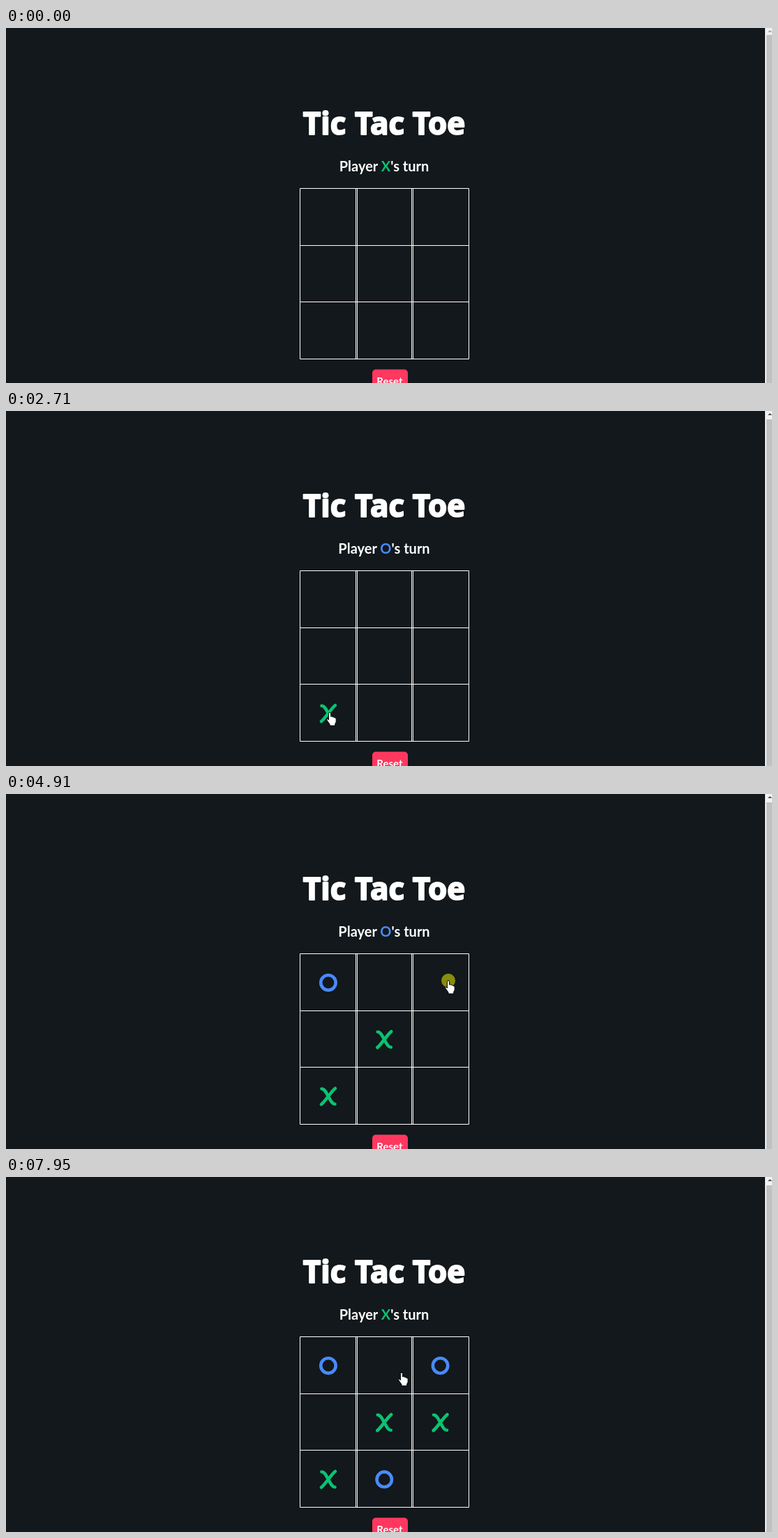
An HTML page that plays this animation: 1098 by 510 pixels, repeating every 8 s.

```html
<!DOCTYPE html>
<html>
<head>
<meta charset="utf-8">
<style>
html, body { margin: 0; height: 100%; overflow: hidden; background: #12181b; }
svg { display: block; }
text { font-family: Lato, "Open Sans", sans-serif; font-weight: 700; fill: #fff; text-anchor: middle; }
.title { font: 700 44px "Open Sans", sans-serif; stroke: #fff; stroke-width: 2; stroke-linejoin: round; }
.turn { font-size: 20px; }
.reset { font-size: 15px; }
.grid { stroke: #fff; fill: none; }
.mark { fill: none; stroke-width: 4.6; stroke-linecap: round; }
.pointer { fill: #fff; stroke: #000; stroke-linejoin: round; }
</style>
</head>
<body>
<svg width="1098" height="510" viewBox="0 0 1098 510">
  <g id="page">
    <text class="title" x="456.5" y="153">Tic</text>
    <text class="title" x="535.5" y="153">Tac</text>
    <text class="title" x="620.5" y="153">Toe</text>
    <text class="turn" x="542" y="205.5">Player <tspan id="player">X</tspan>'s turn</text>
    <path class="grid" d="M421.5 230.5h242v245h-242zM421 312.5h243m-243 81h243M501.5 230v246m2 0v-246m78 0v246m2 0v-246"/>
    <g id="marks"></g>
    <rect x="525" y="490.5" width="51" height="40" rx="5" fill="#ff3860"/>
    <text class="reset" x="550" y="513">Reset</text>
  </g>
  <rect x="1088" width="10" height="510" fill="#f1f1f1"/>
  <path id="arrow" d="M1092 6l3-3 3 3z"/>
  <rect id="thumb" x="1090" width="8" height="510" fill="#c1c1c1"/>
  <circle id="press" r="10" fill="#ff0" fill-opacity=".5"/>
  <path id="hand" class="pointer" d="M-1.6 11V1.5Q-1.6 0 0 0T1.6 1.5V6Q3.5 5 4.3 6.6Q6.3 6 6.8 7.6Q9.2 7 9.2 9.5V13Q9 15 7.8 16V19H0V17L-4.2 11Q-5 9 -3.2 9Q-2 9.3 -1.6 11Z"/>
  <path id="cursor" class="pointer" d="M0 0V16L4 12.5L6.5 18L9 17L6.5 11.5H11.5Z"/>
</svg>
<script>
const LOOP = 8000, ENTER = 200, SCROLL = 700, PRESS = 130;
const players = [
  { name: 'X', color: '#09c372', shape: 'M-9.5-11C-5-11-3-5 0 0S5 11 9.5 11M10-11.5C5-8-5 8-10 11.5' },
  { name: 'O', color: '#498afb', shape: 'M0-10.8a10.7 10.8 0 1 1 0 21.6a10.7 10.8 0 1 1 0-21.6' }
];

// Pointer stops; each glide takes `travel` ms and ends at `time`
const stop = (time, travel, x, y) => ({ time, travel, x, y });
const clicks = [
  stop(2440, 270, 464, 437),
  stop(3400, 760, 466, 276),
  stop(4090, 500, 526, 340),
  stop(4910, 550, 634, 268),
  stop(5780, 410, 639, 366),
  stop(7070, 700, 550, 442)
];
const stops = [
  stop(ENTER, 0, 1079, 281),
  stop(SCROLL, 400, 1092, 258),
  stop(1090, 130, 932, 260),
  stop(1980, 740, 352, 441),
  ...clicks,
  stop(7950, 350, 567, 281)
];

const $ = id => document.getElementById(id);
const show = (el, on) => el.style.display = on ? '' : 'none';
const smooth = k => k * k * (3 - 2 * k);
const cellMiddle = (v, first, size) => first + size * (Math.floor((v - first) / size) + 0.5);

const marks = clicks.map(({ x, y }, i) => {
  const { shape, color } = players[i % 2];
  const el = document.createElementNS('http://www.w3.org/2000/svg', 'path');
  el.setAttribute('class', 'mark');
  el.setAttribute('d', shape);
  el.setAttribute('stroke', color);
  el.setAttribute('transform', `translate(${cellMiddle(x, 421.8, 80.3)} ${cellMiddle(y, 231.2, 81.7)})`);
  return $('marks').appendChild(el);
});

function tipAt(t) {
  let { x, y } = stops[0];
  for (const s of stops.slice(1)) {
    const k = smooth(Math.min(1, Math.max(0, (t - s.time + s.travel) / s.travel)));
    x += (s.x - x) * k;
    y += (s.y - y) * k;
  }
  return [x, y];
}

function draw(t) {
  const scrolled = t >= SCROLL;
  $('page').setAttribute('transform', `translate(0 ${scrolled ? -1 : 0})`);
  $('arrow').setAttribute('fill', scrolled ? '#505050' : '#a3a3a3');
  $('thumb').setAttribute('y', scrolled ? 12 : 10);

  const placed = clicks.filter(c => t >= c.time + PRESS).length;
  const { name, color } = players[placed % 2];
  marks.forEach((el, i) => show(el, i < placed));
  $('player').textContent = name;
  $('player').style.fill = color;

  const [x, y] = tipAt(t);
  const overBoard = x > 421 && x < 664 && y > 229 && y < 475;
  for (const id of ['press', 'hand', 'cursor']) $(id).setAttribute('transform', `translate(${x} ${y})`);
  show($('hand'), overBoard);
  show($('cursor'), t >= ENTER && !overBoard);
  // The highlight leads the press by a moment
  show($('press'), clicks.some(c => t >= c.time - 20 && t < c.time + PRESS));
}

const start = performance.now();
function tick(now) {
  draw(Math.max(0, now - start) % LOOP);
  requestAnimationFrame(tick);
}
tick(start);
</script>
</body>
</html>
```
